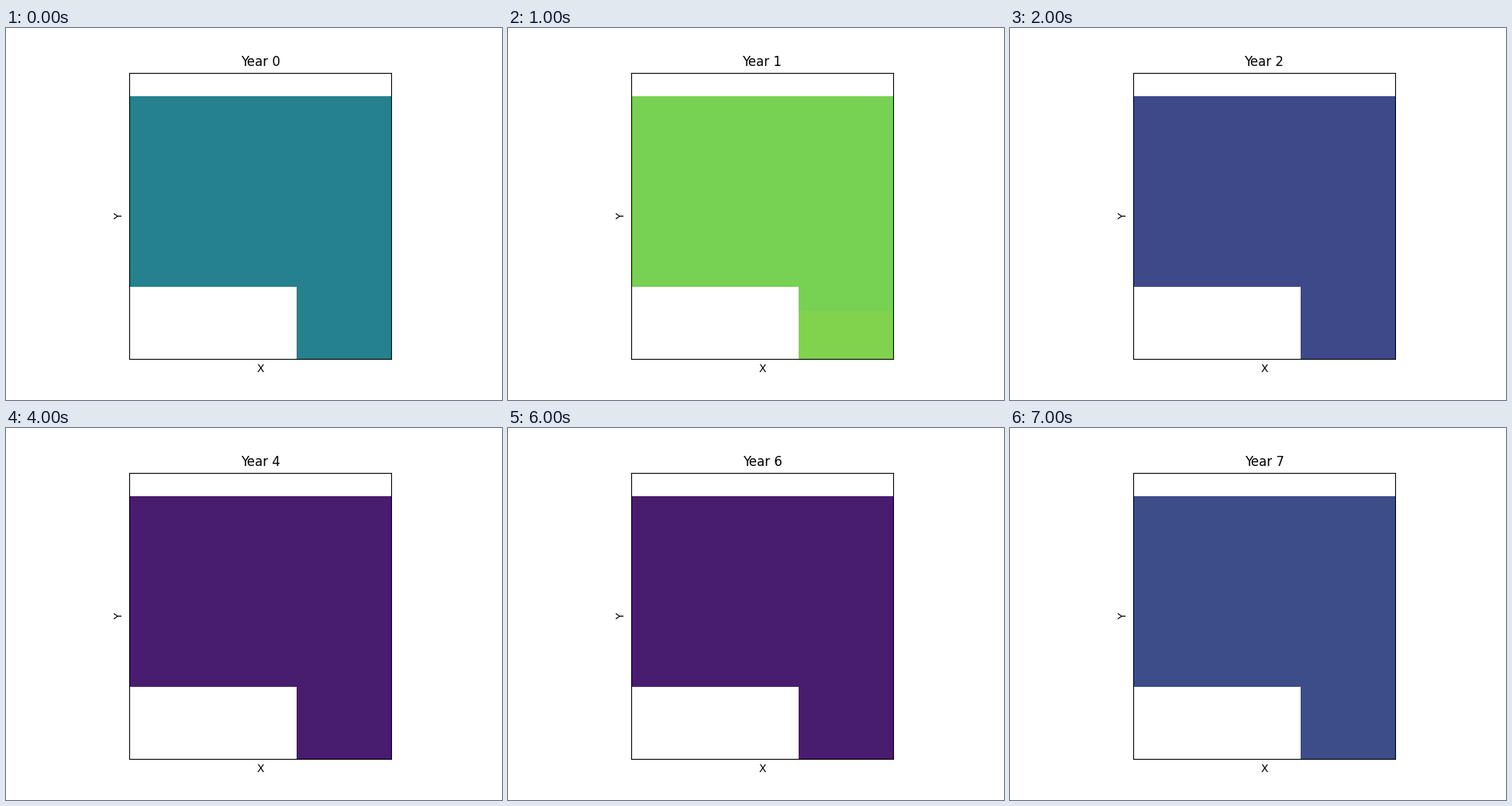
A matplotlib script for the animation above (8 s loop, 640 by 480 pixels).

```python
import numpy as np
import matplotlib.pyplot as plt
from matplotlib.animation import FuncAnimation
from matplotlib.colors import to_rgba

ROWS, COLS = 12, 11

# (main colour, colour of the two lowest rows) for each year
LOW_YEAR = ("#481c6e", "#481c6e")
YEARS = [
    ("#25818e", "#25818e"),
    ("#77d153", "#81d34d"),
    ("#3e4989", "#3e4989"),
    ("#2d6e8e", "#2d708e"),
    LOW_YEAR,
    LOW_YEAR,
    LOW_YEAR,
    ("#3c4d8a", "#3c4d8a"),
]


def grid(year):
    main, lower = YEARS[year]
    cells = np.zeros((ROWS, COLS, 4))
    cells[1:9] = to_rgba(main)
    cells[9, 7:] = to_rgba(main)
    cells[10:, 7:] = to_rgba(lower)
    return cells


fig, ax = plt.subplots(figsize=(6.4, 4.8), dpi=100, facecolor="white")
plt.rcParams["font.family"] = "DejaVu Sans"
image = ax.imshow(grid(0), interpolation="nearest")
ax.set_xticks([])
ax.set_yticks([])
ax.set_xlabel("X")
ax.set_ylabel("Y")
title = ax.set_title("Year 0")


def update(year):
    image.set_data(grid(year))
    title.set_text(f"Year {year}")
    return image, title


anim = FuncAnimation(fig, update, frames=len(YEARS), interval=1000,
                     repeat=True, repeat_delay=0, blit=False)
plt.show()
```
